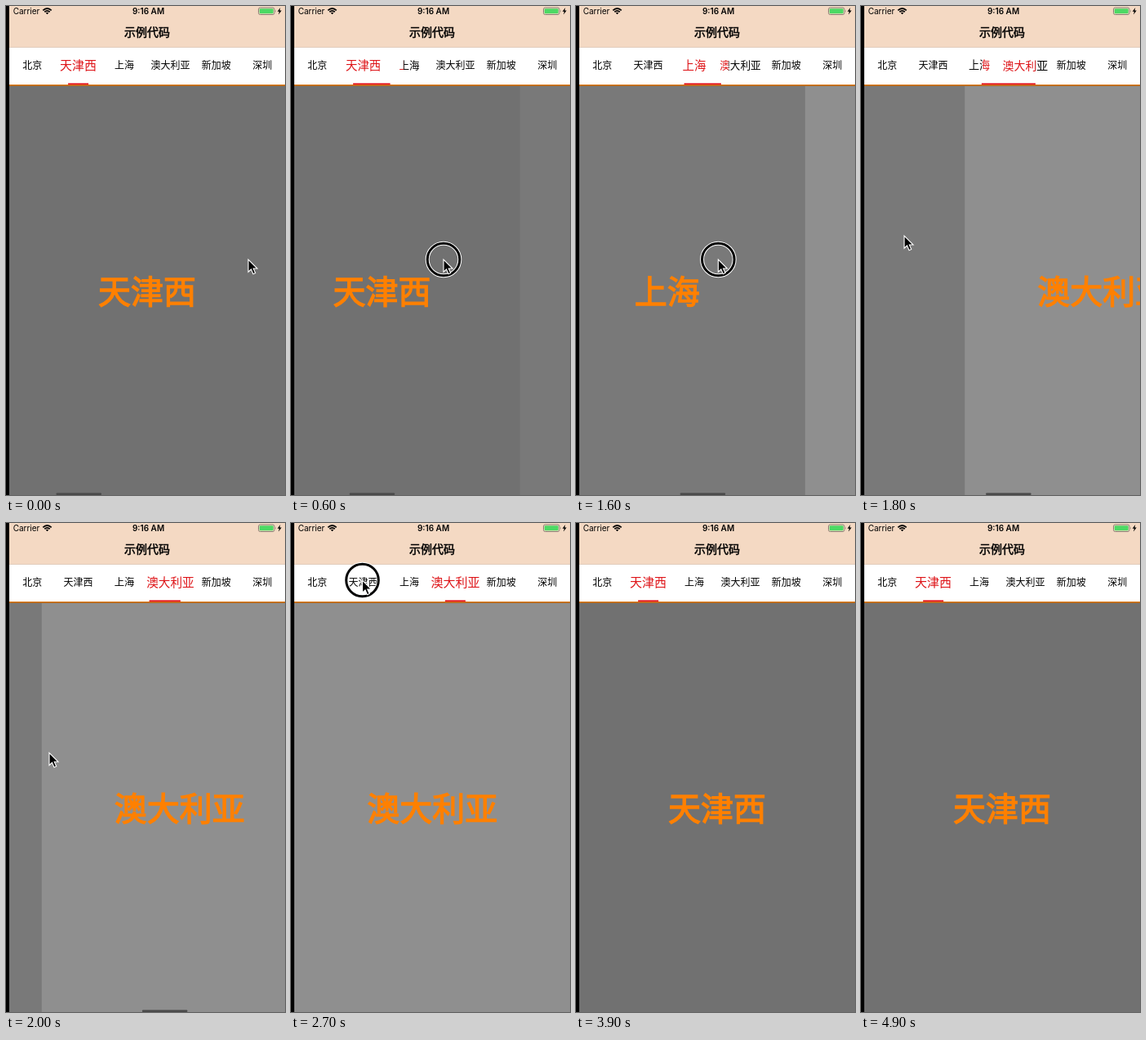
An HTML page that plays this animation: 342 by 598 pixels, repeating every 5 s.

```html
<!DOCTYPE html>
<html lang="zh">
<head>
<meta charset="utf-8">
<style>
html, body { margin: 0; width: 100%; height: 100%; overflow: hidden; background: #000; }
svg { display: block; width: 342px; height: 598px; }
text { font-family: "Noto Sans CJK SC", "Noto Sans CJK", sans-serif; text-anchor: middle; }
.status { font-family: Inter, "Liberation Sans", sans-serif; font-size: 10px; }
.title { font-size: 14px; stroke: #000; stroke-width: .5px; }
.big { font-size: 40px; fill: #ff8000; stroke: #ff8000; stroke-width: 1.3px; }
.tab { font-size: 12px; }
</style>
</head>
<body>
<svg viewBox="0 0 342 598">
  <defs>
    <clipPath id="screen"><rect x="4" width="338" height="598"/></clipPath>
    <g id="grads"></g>
  </defs>
  <g clip-path="url(#screen)">
    <g id="pages"></g>
    <rect id="bar" y="595.5" width="55.5" height="2.5" rx="1" fill="#4a4a4a"/>
    <rect x="4" width="338" height="51" fill="#f4d9c3"/>
    <rect x="4" y="51" width="338" height="45" fill="#fff"/>
    <rect x="4" y="50.5" width="338" height=".5" fill="#cfc0b4"/>
    <rect x="4" y="96" width="338" height="1.8" fill="#dc7f24"/>
    <rect id="line" y="94.4" height="1.8" fill="#e3101c"/>
    <g id="tabs"></g>
    <text class="title" x="173" y="36.8">示例代码</text>
    <text class="status" x="25" y="10">Carrier</text>
    <text class="status" x="174.5" y="10" font-weight="600">9:16 AM</text>
    <g fill="none" stroke="#000" stroke-width="1.8">
      <path d="M45.3 5.3Q50.5 .7 55.7 5.3M47.3 7.3Q50.5 4.5 53.7 7.3"/>
      <path d="M48.7 8.3Q50.5 7 52.3 8.3L50.5 10.3Z" fill="#000" stroke="none"/>
    </g>
    <rect x="309.5" y="2" width="19.5" height="8.5" rx="2" fill="none" stroke="#8d8177"/>
    <rect x="310.7" y="3.2" width="17" height="6.1" rx="1" fill="#4cd964"/>
    <path d="M330 4.8q1.5 1.5 0 3z" fill="#8d8177"/>
    <path d="M336.3 2l-3.6 4.8h2.2l-.8 3.8 3.7-5h-2.3z"/>
  </g>
  <g id="cursor">
    <g id="ring" fill="none">
      <circle r="19.8" stroke="#fff" stroke-width="5"/>
      <circle r="19.8" stroke="#000" stroke-width="3"/>
    </g>
    <path d="M0 0V15.2L3.5 12L6 17.7L8.7 16.5L6.2 11H11Z" stroke="#fff" stroke-width="1.1"/>
  </g>
</svg>
<script>
const $ = id => document.getElementById(id);
const clamp = v => Math.min(1, Math.max(0, v));
const LOOP = 5000, STEP = 100, WIDTH = 338, PITCH = 56.4, RED = '#de1418';
const SWIPES = [500, 1500], PRESS = 2600, JUMP = 3100;
const names = ['北京', '天津西', '上海', '澳大利亚', '新加坡', '深圳'];
const center = i => 32.2 + PITCH * i;

names.forEach((name, i) => {
  const grey = 113 + 7.5 * (i - 1) ** 2;
  $('grads').innerHTML += `<linearGradient id="g${i}">${'<stop/>'.repeat(4)}</linearGradient>`;
  $('pages').innerHTML += `<rect x="${4 + i * WIDTH}" y="98" width="${WIDTH + 1}" height="500"
    fill="rgb(${grey},${grey},${grey})"/><text class="big" x="${173 + i * WIDTH}" y="363.5">${name}</text>`;
  $('tabs').innerHTML += `<text class="tab" y="4.5" fill="url(#g${i})">${name}</text>`;
});

// Red between two fractions of a tab's width, black elsewhere
function paint(i, from, to) {
  [...$('g' + i).children].forEach((stop, n) => {
    stop.setAttribute('offset', n < 2 ? from : to);
    stop.setAttribute('stop-color', n % 3 ? RED : '#000');
  });
}

// A drag that gathers speed, then settles softly
const swipe = u => u > 0 ? 1 - Math.exp(-((u / 298) ** 1.47)) : 0;
const scroll = t => SWIPES.reduce((pos, s) => pos + swipe(t - s), 1);

function pointer(t) {
  const r = (a, b) => clamp((t - a) / (b - a));
  const back = r(1000, 1400), toTab = r(2000, 2500), leave = r(3040, 3500) ** 2;
  return [
    297 - 49 * r(300, 500) - 183 * r(500, 800) + 170 * back - 182 * r(1500, 1800) + 34.5 * toTab + 272 * leave,
    310 - 29 * (r(600, 800) - back + r(1600, 1800)) - 211 * toTab + 350 * leave
  ];
}

function draw(t) {
  const pos = t < JUMP ? scroll(t) : 1, page = Math.floor(pos), p = pos - page;
  $('pages').setAttribute('transform', `translate(${-pos * WIDTH})`);

  [...$('tabs').children].forEach((tab, i) => {
    const near = Math.max(0, 1 - Math.abs(pos - i));
    tab.setAttribute('transform', `translate(${center(i)} 72.5) scale(${1 + near / 4})`);
    if (i === page) paint(i, clamp((p - .2) / .65), 1);
    else paint(i, 0, i === page + 1 ? clamp(p * 1.15) : 0);
  });

  // The underline stretches to the next tab, then its tail catches up
  const left = center(page) - 12.5 + PITCH * clamp(2 * p - 1);
  const right = center(page) + 12.5 + PITCH * clamp(2 * p);
  $('line').setAttribute('x', left);
  $('line').setAttribute('width', right - left);

  $('bar').setAttribute('x', 5.5 + pos * 56);
  $('bar').setAttribute('opacity', clamp((2600 - t) / 300));

  const pressed = SWIPES.some(s => t >= s && t <= s + 200) || t >= PRESS && t < JUMP;
  $('cursor').setAttribute('transform', `translate(${pointer(t).join(' ')})`);
  $('ring').setAttribute('visibility', pressed ? 'visible' : 'hidden');
}

const start = performance.now();
function tick() {
  const t = (performance.now() - start) % LOOP;
  draw(Math.floor(t / STEP) * STEP);
  requestAnimationFrame(tick);
}
tick();
</script>
</body>
</html>
```
